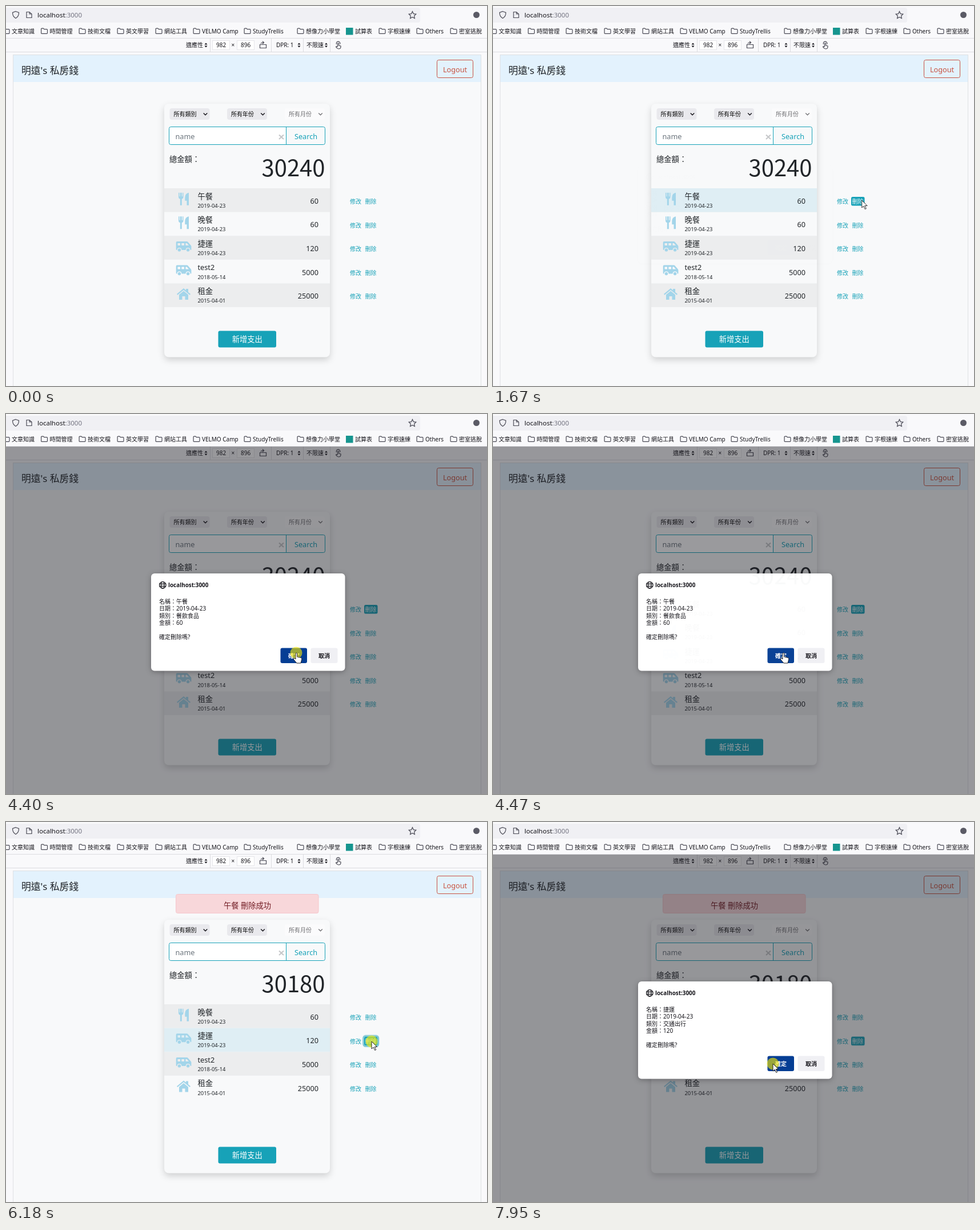
Animation of 842x665 px, one loop 8000 ms. Source, as an HTML page:

```html
<!DOCTYPE html>
<html lang="zh-Hant">
<head>
<meta charset="utf-8">
<title>Expense list</title>
<style>
html, body { margin: 0; width: 100%; height: 100%; overflow: hidden; background: #f9f9fb; }
svg { display: block; width: 842px; height: 665px; font-family: "Noto Sans", "Noto Sans CJK TC", sans-serif; font-size: 10px; fill: #15141a; }
.line { fill: none; stroke: #4a4a55; stroke-width: 1.2; }
.rule { stroke: #dcdce0; }
.page { fill: #212529; font-size: 13.3px; }
.lat { font-size: 12.7px; }
.date { font-size: 9.4px; }
.cjk { font-weight: 300; }
.total { font-family: "Noto Sans CJK TC", sans-serif; font-size: 40px; }
.teal { fill: #17a2b8; }
.small { font-size: 10px; }
.end { text-anchor: middle; }
.right { text-anchor: end; }
.bold { font-weight: 600; }

/* one loop is 8 s, so 1% = 80 ms */
.step { animation: 8s step-end infinite; }
.flow { animation: 8s linear infinite; }

#tint { animation-name: tint; }
@keyframes tint {
  0% { opacity: 0; transform: translateY(83.2px); }
  11.6% { opacity: 1; transform: translateY(83.2px); }
  12.6% { opacity: 1; transform: translateY(41.6px); }
  13.6% { opacity: 1; transform: none; }
  55.875% { opacity: 1; transform: translateY(83.2px); }
  57.7% { opacity: 1; transform: translateY(41.6px); }
  60.2% { opacity: 1; transform: none; }
  67.8%, 100% { opacity: 1; transform: translateY(41.6px); }
}
.before { animation-name: before; }
@keyframes before { 0% { opacity: 1; } 58.75%, 100% { opacity: 0; } }
.after { animation-name: after; }
@keyframes after { 0% { opacity: 0; } 58.75%, 100% { opacity: 1; } }

#caret { animation-name: caret; }
@keyframes caret { 0% { opacity: 0; } 12% { opacity: 1; } 20.875%, 100% { opacity: 0; } }

#remove { animation-name: remove; }
@keyframes remove {
  0%, 13.8% { opacity: 0; transform: none; }
  14.1%, 58.74% { opacity: 1; transform: none; }
  58.75% { opacity: 0; transform: none; }
  58.8%, 70.5% { opacity: 0; transform: translateY(41.6px); }
  72.2%, 100% { opacity: 1; transform: translateY(41.6px); }
}
#ring { animation-name: ring; }
@keyframes ring { 0% { opacity: 0; } 77.25% { opacity: 1; } 79.75%, 100% { opacity: 0; } }
#edit { animation-name: edit; }
@keyframes edit { 0%, 60.2% { opacity: 0; } 61.2% { opacity: .8; } 62% { opacity: .55; } 64.375%, 100% { opacity: 0; } }
#alert { animation-name: alert; }
@keyframes alert { 0%, 59.75% { opacity: 0; } 64.375%, 100% { opacity: 1; } }

#dialog { animation-name: dialog; }
@keyframes dialog {
  0%, 20.875% { opacity: 0; }
  22.5%, 55.875% { opacity: 1; }
  56.5%, 78% { opacity: 0; }
  78.7%, 100% { opacity: 1; }
}
#ok { animation-name: ok; }
@keyframes ok {
  0% { fill: #0061e0; }
  49% { fill: #0250bb; }
  54.125% { fill: #053e94; }
  56.5% { fill: #0061e0; }
  97% { fill: #0250bb; }
  99.1%, 100% { fill: #053e94; }
}

#pointer { animation-name: pointer; }
@keyframes pointer {
  0%, 9.75% { transform: translate(820px, 653px); }
  10.75% { transform: translate(720px, 560px); }
  12% { transform: translate(547px, 423px); }
  13.25% { transform: translate(600px, 375px); }
  14.125%, 20.875% { transform: translate(646px, 340px); }
  29.125% { transform: translate(319px, 324px); }
  30.875%, 34.125% { transform: translate(308px, 330px); }
  36.5%, 41.625% { transform: translate(308px, 343px); }
  42.5%, 45% { transform: translate(308px, 350px); }
  49.75%, 56.75% { transform: translate(508px, 418px); }
  61.125% { transform: translate(606px, 338px); }
  61.875%, 66.125% { transform: translate(628px, 347px); }
  72.25%, 90.875% { transform: translate(640px, 384px); }
  97.5%, 100% { transform: translate(490px, 423px); }
}
#arrow { animation-name: arrow; }
@keyframes arrow {
  0% { opacity: 0; } 6.5% { opacity: 1; } 30% { opacity: 0; }
  46.25% { opacity: 1; } 49.25% { opacity: 0; } 56.25%, 100% { opacity: 1; }
}
#beam { animation-name: beam; }
@keyframes beam { 0% { opacity: 0; } 30% { opacity: 1; } 46.25%, 100% { opacity: 0; } }
#hand { animation-name: hand; }
@keyframes hand { 0% { opacity: 0; } 49.25% { opacity: 1; } 56.25%, 100% { opacity: 0; } }
#halo { animation-name: halo; }
@keyframes halo {
  0% { opacity: 0; } 19.125% { opacity: 1; } 20.875% { opacity: 0; }
  54.125% { opacity: 1; } 55.875% { opacity: 0; }
  77.25% { opacity: 1; } 78% { opacity: 0; } 99.1%, 100% { opacity: 1; }
}
</style>
</head>
<body>
<svg viewBox="0 0 842 665">
  <defs>
    <path id="folder" class="line" d="M.6 9.5V1.8Q.6.6 1.8.6H4.3L5.8 2.2H10.4Q11.5 2.2 11.5 3.4V8.6Q11.5 9.9 10.3 9.9H1.8Q.6 9.9.6 8.7z"/>
    <path id="sort" d="M-2.5-1L0-4 2.5-1zM-2.5 1L0 4 2.5 1z"/>
    <path id="chevron" fill="none" stroke-width="1.4" d="M-3.3-1.6L0 1.7 3.3-1.6"/>
    <path id="food" d="M-9-11V-4Q-9-.5-6.2 0V11h3V0Q-.5-.5-.5-4V-11H-2V-4.5H-3.2V-11H-6.2V-4.5H-7.4V-11zM9-11V11H5.5V3H2.3V-2Q2.3-10 9-11z"/>
    <g id="van">
      <path fill-rule="evenodd" d="M-11.5-9H5.6Q6.6-9 7.3-8.2L12.7-2Q13.4-1.2 13.4 0V5Q13.4 6 12.4 6H11.6A4 4 0 0 0 3.6 6H-3.6A4 4 0 0 0-11.6 6H-12.3Q-13.3 6-13.3 5V-7Q-13.3-9-11.5-9zM-10.5-6v4h4.5v-4zM-3.7-6v4h4.7v-4zM3.4-6v4h5.6L5.6-6z"/>
      <circle cx="-7.6" cy="6" r="2.7"/><circle cx="7.6" cy="6" r="2.7"/>
    </g>
    <path id="home" d="M-12 0L0-10 4-6.7V-9H8V-3.4L12 0 10.7 1.6 0-7.2-10.7 1.6zM-8 1.2L0-5.4 8 1.2V10H2.5V4H-2.5V10H-8z"/>
  </defs>

  <rect width="842" height="665" fill="#f9f9fb"/>
  <rect x="-10" y="3" width="735" height="26" rx="4" fill="#f0f0f4"/>
  <path class="line" d="M17 9.5L22.5 11.5Q22.5 18.5 17 21.5 11.5 18.5 11.5 11.5z"/>
  <path class="line" d="M36 10.5H41L45 14V20.5H36zM41 10.5V14H45"/>
  <text x="55" y="20" font-size="11.5">localhost<tspan fill="#737380">:3000</tspan></text>
  <path class="line" d="M711.5 9.5L713.4 13.6 717.8 14.1 714.6 17.2 715.4 21.6 711.5 19.5 707.6 21.6 708.4 17.2 705.2 14.1 709.6 13.6z"/>
  <circle cx="823.5" cy="15.5" r="5.5" fill="#5b5b66"/>
  <g id="bookmarks"></g>

  <path class="rule" d="M0 56.5H842M0 80.5H842M357.5 57V80M464.5 57V80M520.5 57V80M567.5 57V80"/>
  <g fill="#fff" stroke="#e6e6ea">
    <rect x="361.5" y="60.5" width="30" height="16"/><rect x="404.5" y="60.5" width="30" height="16"/>
  </g>
  <text x="315" y="72">適應性</text><use href="#sort" x="350" y="68.5"/>
  <text x="368" y="72">982</text><text x="394.5" y="72">×</text><text x="411" y="72">896</text>
  <path class="line" d="M444.5 67.5H455.5V73.5H444.5zM446 66Q446.5 64 451 64M449 61.8L451.5 64 449 66.2"/>
  <text x="473" y="72">DPR: 1</text><use href="#sort" x="513" y="68.5"/>
  <text x="526" y="72">不限速</text><use href="#sort" x="560.5" y="68.5"/>
  <path class="line" d="M580.5 71V65.5Q581.5 64 582.5 65.5V69L586 70V72Q585.5 75 582.5 75 580 75 577.5 71.5L578.5 70.5 580.5 71.5M578.5 67Q577.5 62.5 581.5 62.2 585.5 62.5 584.7 67"/>

  <g class="page">
    <rect x="12.5" y="85.5" width="819" height="590" fill="#f8f9fa" stroke="#dfe1e4"/>
    <rect x="13" y="86" width="818" height="47" fill="#e3f2fd"/>
    <text class="cjk" x="27" y="118.5" font-size="16.8">明遠's 私房錢</text>
    <rect x="754.5" y="94.5" width="63" height="31" rx="3" fill="none" stroke="#c8523f"/>
    <text class="lat end" x="786" y="115.7" style="fill:#c8523f">Logout</text>

    <rect x="277" y="171" width="290" height="443.5" rx="8" fill="#f8f9fa" style="filter:drop-shadow(0 5px 6px rgba(0,0,0,.16))"/>
    <g fill="#e9e9ed">
      <rect x="286.5" y="179" width="70" height="20" rx="4"/><rect x="387" y="179" width="70" height="20" rx="4"/>
      <rect x="488" y="179" width="70" height="20" rx="4" fill="#fbfbfc"/>
    </g>
    <g class="small" fill="#000">
      <text x="293.5" y="192.7">所有類別</text><text x="394" y="192.7">所有年份</text>
      <text x="495" y="192.7" fill="#6d6d70">所有月份</text>
    </g>
    <g stroke="#15141a">
      <use href="#chevron" x="349" y="189"/><use href="#chevron" x="449.5" y="189"/>
      <use href="#chevron" x="550.5" y="189" stroke="#77777a"/>
    </g>
    <path fill="#fff" d="M289 212H491V242H289Q286 242 286 239V215Q286 212 289 212z"/>
    <rect x="285.5" y="211.5" width="273" height="31" rx="3" fill="none" stroke="#17a2b8"/>
    <path d="M490.5 212V242" stroke="#17a2b8"/>
    <text class="lat" x="296.5" y="233.2" fill="#6c757d">name</text>
    <path d="M478 225.500L486 233M486 225.500L478 233" stroke="#c6c8ca" stroke-width="2.2"/>
    <text class="lat end teal" x="525" y="233.2">Search</text>
    <text class="cjk" x="286" y="272.5">總金額：</text>

    <path fill="#ecedee" d="M277 319H567V360.600H277zM277 402.200H567V443.800H277z"/>
    <rect id="tint" class="step" x="277" y="319" width="290" height="41.6" fill="#dfeef4"/>
    <g id="lists"></g>
    <path id="caret" class="step" d="M546.5 416V431" stroke="#333"/>

    <g id="remove" class="flow">
      <rect id="ring" class="step" x="625.5" y="332.5" width="26.5" height="18.5" rx="4" fill="none" stroke="#7cc6d4" stroke-width="2.5"/>
      <rect class="teal" x="627" y="334" width="23.5" height="15.5" rx="2.5"/>
      <text class="small" x="628.5" y="346" fill="#fff">刪除</text>
    </g>
    <g id="edit" class="flow">
      <rect class="teal" x="600.5" y="334" width="23.5" height="15.5" rx="2.5"/>
      <text class="small" x="602" y="346" fill="#fff">修改</text>
    </g>

    <rect class="teal" x="371.5" y="568.5" width="101.5" height="29" rx="3"/>
    <text class="end cjk" x="422.3" y="588.3" fill="#fff">新增支出</text>

    <g id="alert" class="flow">
      <rect x="297.5" y="126.5" width="249.5" height="33" rx="3" fill="#f8d7da" stroke="#f5c6cb"/>
      <text class="end cjk" x="422.5" y="150.7" fill="#721c24">午餐 刪除成功</text>
    </g>
  </g>

  <g id="dialog" class="flow">
    <rect y="57" width="842" height="608" fill="#1c1b22" fill-opacity=".45"/>
    <rect x="254" y="279" width="339.5" height="170.5" rx="6" fill="#fff" style="filter:drop-shadow(0 2px 5px rgba(0,0,0,.3))"/>
    <g class="line" style="stroke:#15141a">
      <circle cx="274.3" cy="299.3" r="5.8"/><ellipse cx="274.3" cy="299.3" rx="2.7" ry="5.8"/>
      <path d="M268.5 297.3H280M268.5 301.3H280"/>
    </g>
    <text class="bold" x="284" y="303" font-size="9.9">localhost:3000</text>
    <g id="details"></g>
    <text x="268" y="394">確定刪除嗎?</text>
    <rect id="ok" class="step" x="480.5" y="409.5" width="46.5" height="26.5" rx="3" fill="#0061e0"/>
    <text class="bold end" x="504" y="427" fill="#fff">確定</text>
    <rect x="533.5" y="409.5" width="47" height="26.5" rx="3" fill="#f0f0f4"/>
    <text class="bold end" x="557" y="427">取消</text>
  </g>

  <g id="pointer" class="flow">
    <circle id="halo" class="step" r="10.5" fill="#ffee00" fill-opacity=".6"/>
    <path id="arrow" class="step" d="M0 0V13L3.2 10.2 5.7 15.5 7.7 14.6 5.3 9.5H9.5z" fill="#fff" stroke="#111" stroke-width=".9"/>
    <path id="beam" class="step" d="M-2.5-6.5H2.5M0-6.5V6.5M-2.5 6.5H2.5" stroke="#222"/>
    <path id="hand" class="step" d="M-1 1Q.3-1 1.8 1V7L8.5 8.5Q10 9 9.7 11.5L8 18H1L-4.5 11.5Q-5 9-2.8 9.5L-1 11z" fill="#fff" stroke="#111" stroke-width=".9"/>
  </g>
</svg>
<script>
const rowHeight = 41.6, listTop = 319;
const text = (x, y, str, cls = "") => `<text x="${x}" y="${y}" class="${cls}">${str}</text>`;
const fill = (id, html) => { document.getElementById(id).innerHTML = html; };

const bookmarks = [
  [10, "文章知識"], [76.5, "時間管理"], [143, "技術文檔"], [210, "英文學習"],
  [277, "網站工具"], [343, "VELMO Camp"], [432, "StudyTrellis"], [525, "想像力小學堂"],
  [611, "試算表"], [668, "字根速練"], [734, "Others"], [793, "密室逃脫"]
];
fill("bookmarks", bookmarks.map(([x, name]) =>
  (name === "試算表"
    ? `<rect x="595" y="38" width="12.5" height="12.5" fill="#16958f"/>`
    : `<use href="#folder" x="${x - 15.5}" y="38.5"/>`) + text(x, 48, name)).join(""));

const expenses = [
  { name: "午餐", date: "2019-04-23", amount: 60, icon: "food", type: "餐飲食品" },
  { name: "晚餐", date: "2019-04-23", amount: 60, icon: "food" },
  { name: "捷運", date: "2019-04-23", amount: 120, icon: "van", type: "交通出行" },
  { name: "test2", date: "2018-05-14", amount: 5000, icon: "van" },
  { name: "租金", date: "2015-04-01", amount: 25000, icon: "home" }
];

function row(item, i) {
  const y = listTop + i * rowHeight;
  const stripe = i === 4 ? `<rect x="277" y="${y}" width="290" height="${rowHeight}" fill="#ecedee"/>` : "";
  return stripe +
    `<use href="#${item.icon}" x="311" y="${y + 18.7}" fill="#a3d5ea"/>` +
    text(335.5, y + 18.5, item.name, item.name === "test2" ? "lat" : "cjk") +
    text(335.5, y + 33.7, item.date, "date") +
    text(547, y + 26.7, item.amount, "lat right") +
    text(602, y + 27, "修改", "small teal") + text(628.5, y + 27, "刪除", "small teal");
}

function list(items, state) {
  const total = items.reduce((sum, e) => sum + e.amount, 0);
  return `<g class="step ${state}">` + text(558.5, 298.3, total, "total right") +
    items.map(row).join("") + "</g>";
}
fill("lists", list(expenses, "before") + list(expenses.slice(1), "after"));

function details(e, state) {
  const lines = [`名稱：${e.name}`, `日期：${e.date}`, `類別：${e.type}`, `金額：${e.amount}`];
  return `<g class="step ${state}">` + lines.map((s, i) => text(268, 331.5 + i * 12.5, s)).join("") + "</g>";
}
fill("details", details(expenses[0], "before") + details(expenses[2], "after"));
</script>
</body>
</html>
```
